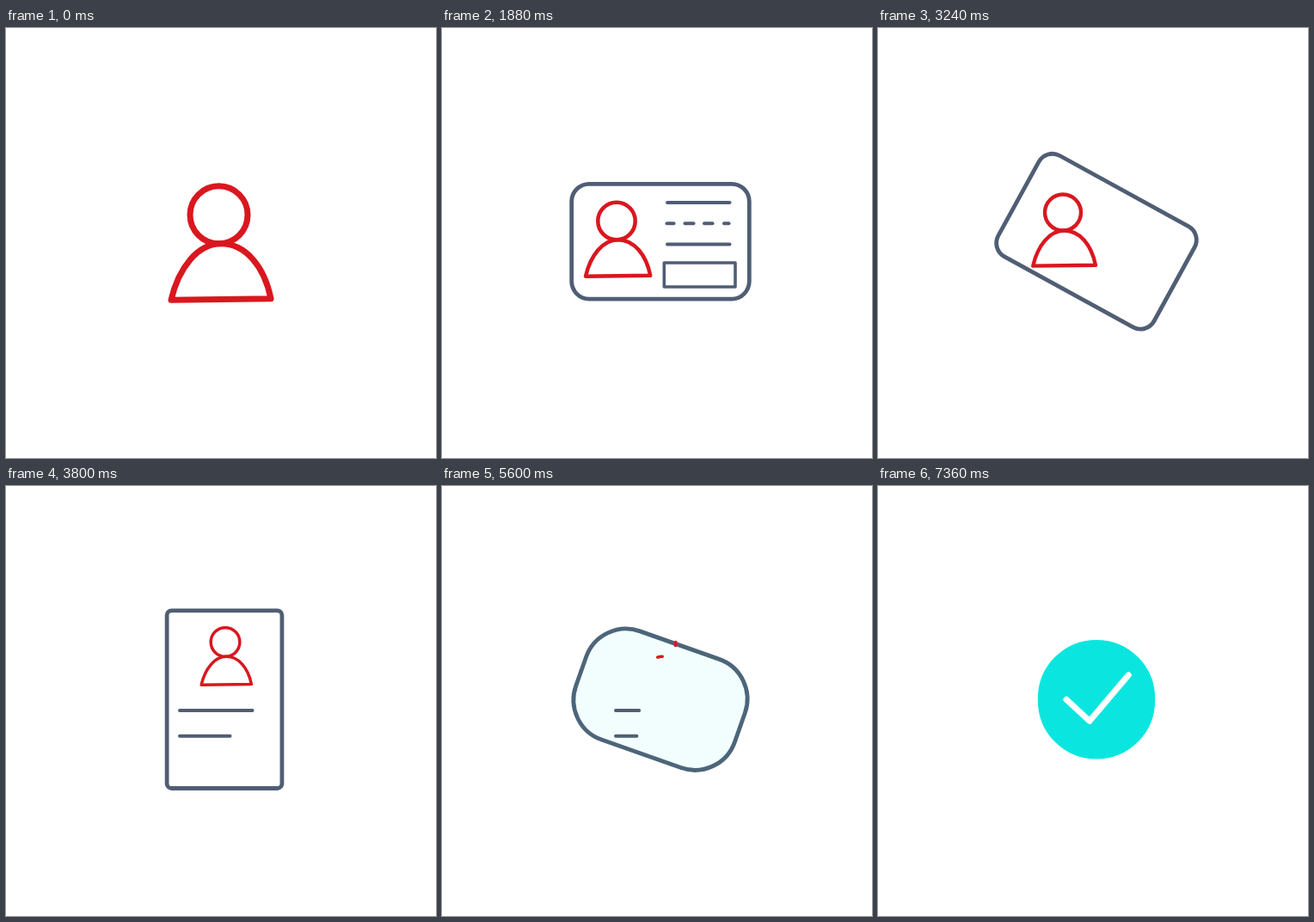
Recreate the animation shown at these times as an HTML page with a canvas. Size 500 by 500 pixels, loop 8.04 s.

```html
<!DOCTYPE html>
<html lang="en">
<head>
<meta charset="utf-8">
<title>Identity check</title>
<style>
html, body { margin: 0; width: 100%; height: 100%; overflow: hidden; background: #fff; }
canvas { display: block; width: 100vmin; height: 100vmin; }
</style>
</head>
<body>
<canvas id="stage" width="500" height="500"></canvas>
<script>
const ctx = document.getElementById('stage').getContext('2d');
const LOOP = 8040;
const RED = '#d9171f', SLATE = [80, 94, 116], CYAN = [10, 230, 223];
const CENTER = { x: 254, y: 248.2 };

const mix = (a, b, p) => a + (b - a) * p;
const rgb = (c, alpha = 1) => `rgba(${c.join(',')},${alpha})`;
const SLATE_CSS = rgb(SLATE), CYAN_CSS = rgb(CYAN);

// Smooth progress from 0 to 1 between two times.
function ease(t, start, end) {
  const u = Math.min(1, Math.max(0, (t - start) / (end - start)));
  return u * u * (3 - 2 * u);
}

// Strokes the leading part of a path whose full length is known.
function trim(path, length, part, color, width) {
  if (part <= 0) return;
  ctx.strokeStyle = color;
  ctx.lineWidth = width;
  ctx.setLineDash(part < 1 ? [length * part, length * 2] : []);
  ctx.stroke(path);
  ctx.setLineDash([]);
}

function line(x1, x2, y, part, width = 4) {
  const path = new Path2D(`M${x1} ${y}H${x2}`);
  trim(path, x2 - x1, part, SLATE_CSS, width);
}

const HEAD = new Path2D();
HEAD.arc(0, 0, 33.5, 0, Math.PI * 2);
HEAD.closePath();
const BODY = new Path2D('M2.5 33.5C-25 33.5 -47 62 -55.5 99L60.5 97.5C53 60 31 33.5 2.5 33.5Z');

function person(t) {
  const part = 1 - ease(t, 5000, 5680);
  if (part <= 0) return;
  const shrink = ease(t, 0, 840), move = ease(t, 3110, 3530);
  const x = mix(mix(247.5, 203, shrink), 255, move);
  const y = mix(mix(217.3, 224.5, shrink), 181.5, move);
  const size = mix(mix(1, 0.648, shrink), 0.502, ease(t, 3160, 3500));
  ctx.save();
  ctx.translate(x, y);
  ctx.scale(size, size);
  trim(HEAD, 210.5, part, RED, 7);
  trim(BODY, 299, part, RED, 7);
  ctx.restore();
}

function card(t) {
  const drawn = ease(t, 120, 1120);
  if (drawn <= 0) return;
  const angle = 90 * (ease(t, 3112, 3454) - ease(t, 5300, 5730));
  const w = mix(206.6, 131.5, ease(t, 5520, 5860)), h = 133.8;
  const r = mix(mix(20.5, 5.5, ease(t, 3150, 3500)), 65.7, ease(t, 5300, 5760));
  const tint = ease(t, 5560, 5860);
  const color = SLATE.map((v, i) => Math.round(mix(v, CYAN[i], tint)));
  const path = new Path2D();
  path.roundRect(-w / 2, -h / 2, w, h, r);
  ctx.save();
  ctx.translate(CENTER.x, CENTER.y);
  ctx.rotate(angle * Math.PI / 180);
  if (tint > 0) {
    ctx.fillStyle = rgb(CYAN, tint);
    ctx.fill(path);
  }
  trim(path, 2 * (w + h) - (8 - 2 * Math.PI) * r, drawn, rgb(color), 4.8);
  ctx.restore();
}

const DASHES = [[261.5, 269.5], [282.5, 292.5], [305, 314.5], [328, 333.5]];
const FIELD = new Path2D('M258.3 273H341V301H258.3Z');

function cardDetails(t) {
  const gone = ease(t, 2600, 3160);
  const part = start => ease(t, start, start + 560) - gone;
  line(262, 334.5, 203, part(900));
  const dashed = part(1040) * DASHES.length;
  DASHES.forEach(([a, b], i) => line(a, b, 227.2, Math.min(1, dashed - i)));
  line(262, 334.5, 251.5, part(1180));
  trim(FIELD, 221.4, part(1320), SLATE_CSS, 3.6);
}

const SEAL = new Path2D('M303.5 302A12 12 0 1 1 279.5 302A12 12 0 1 1 303.5 302');
const RIBBON = new Path2D('M284 312V330L291.5 324L299 330V312');

function pageDetails(t) {
  line(202, 286.5, 261, ease(t, 3440, 3780) - ease(t, 5250, 5815));
  line(202, 260.5, 290.7, ease(t, 3500, 3800) - ease(t, 5290, 5850));
  const gone = ease(t, 5000, 5500);
  trim(SEAL, 75.4, ease(t, 3840, 4360) - gone, SLATE_CSS, 3.2);
  trim(RIBBON, 55.2, ease(t, 4000, 4440) - gone, SLATE_CSS, 3.2);
}

// Directions in which the small bubbles leave the badge.
const BUBBLES = [[-194, -116], [125, -117], [114, 129], [194, 30], [-150, 96]];

function bubbles(t) {
  const u = (t - 6160) / 1200;
  if (u <= 0 || u >= 1) return;
  const travel = 0.18 + 0.82 * (1 - (1 - u) ** 2);
  const radius = 4 * Math.sin(Math.PI * u);
  BUBBLES.forEach(([dx, dy]) => {
    ctx.beginPath();
    ctx.arc(CENTER.x + dx * travel, CENTER.y + dy * travel, radius, 0, Math.PI * 2);
    ctx.fillStyle = '#fff';
    ctx.fill();
    ctx.strokeStyle = CYAN_CSS;
    ctx.lineWidth = radius * 0.6;
    ctx.stroke();
  });
}

const CHECK = new Path2D('M219 248.3L246 273.3L291.3 219.8');

function draw(t) {
  ctx.fillStyle = '#fff';
  ctx.fillRect(0, 0, 500, 500);
  ctx.lineCap = ctx.lineJoin = 'round';
  card(t);
  cardDetails(t);
  pageDetails(t);
  person(t);
  bubbles(t);
  trim(CHECK, 106.9, ease(t, 5840, 6346), '#fff', 7);
}

const begin = performance.now();
function tick() {
  draw((performance.now() - begin) % LOOP);
  requestAnimationFrame(tick);
}
tick();
</script>
</body>
</html>
```
